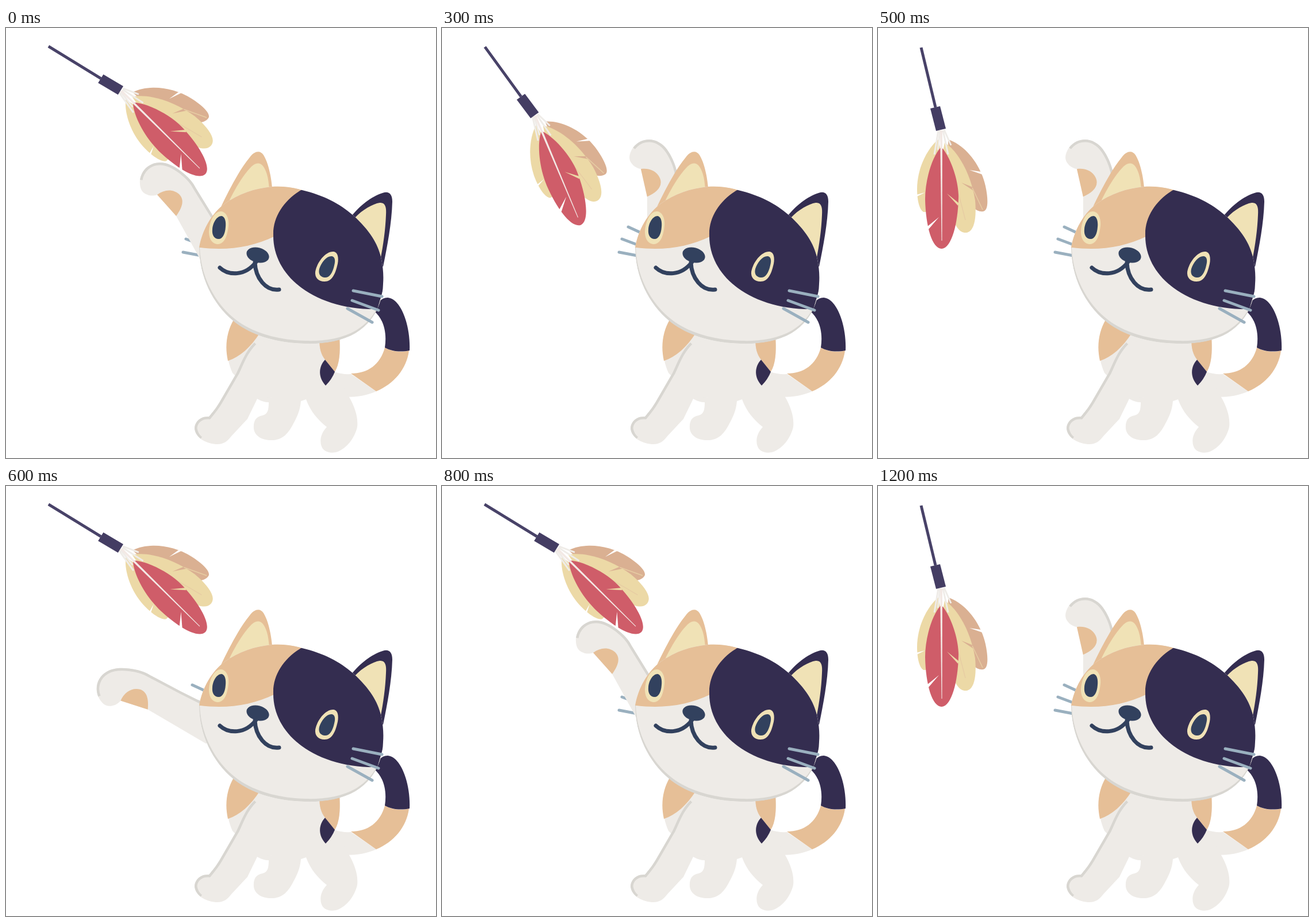
Recreate the animation shown at these times as an HTML page. Size 748x748 px, loop 1300 ms.

```html
<!DOCTYPE html>
<html lang="en">
<head>
<meta charset="utf-8">
<title>Cat and feather toy</title>
<style>
  html, body { margin: 0; width: 100%; height: 100%; overflow: hidden; background: #fff; }
  svg { display: block; width: 100%; height: 100%; }
  .light { fill: #eeebe7; }
  .shade { fill: #d8d6d1; }
  .orange { fill: #e6bf97; }
  .dark { fill: #342d50; }
  .cream { fill: #f0e2b6; }
  .navy { fill: #32415e; }
  .tan { fill: #dab092; }
  .straw { fill: #ecd9a6; }
  .red { fill: #cf5d69; }
  .white { fill: #fff; }
  .line { fill: none; stroke-linecap: round; }
  .edge { fill: none; stroke: #d8d6d1; stroke-width: 9; }
  .whisker { stroke: #9ab0bf; stroke-width: 5; }
  .mouth { stroke: #32415e; stroke-width: 7; }
  .quill { fill: none; stroke: #efece8; stroke-width: 3; }
</style>
</head>
<body>
<svg viewBox="0 0 748 748">
  <defs>
    <path id="headShape" d="M336 382C341 352 358 322 380 306C405 288 432 279 463 276C482 275 500 277 515 282C552 291 580 305 604 326C633 352 647 376 652 398C656 415 657 430 656 445C655 478 642 510 608 531C582 546 550 550 520 549C478 548 436 538 405 517C362 487 336 435 336 382Z"/>
    <path id="armShape" d="M263 290C258 292 250 292 246 290C236 287 232 278 233 264C236 246 250 234 268 234C280 234 292 240 304 249C316 258 325 268 330 278L362 330L420 420L353 430L296 327Z"/>
    <path id="legShape" d="M432 547C416 563 410 581 401 600L372 650C365 662 358 670 353 676C336 675 328 687 328 697C330 712 345 722 365 724C378 725 385 719 392 710L420 680L437 645L480 640L500 540Z"/>
    <clipPath id="headClip"><use href="#headShape"/></clipPath>
    <clipPath id="armClip"><use href="#armShape"/></clipPath>
    <clipPath id="legClip"><use href="#legShape"/></clipPath>
  </defs>

  <!-- tail -->
  <path class="light" d="M600 602L644 632C628 639 612 642 590 642L556 620L570 598Q585 603 600 602Z"/>
  <path class="orange" d="M659 556C672 563 687 565 701 561C697 593 675 619 644 632L600 601C630 601 651 585 659 556Z"/>
  <path class="dark" d="M641 493C645 479 652 469 664 469C688 471 704 520 702 561C687 564 672 563 659 556C663 530 657 507 641 493Z"/>

  <!-- body and legs -->
  <path class="light" d="M400 500C384 522 378 565 394 600L437 645Q447 651 457 651C457 665 455 672 446 674C434 676 430 685 431 697C433 711 447 718 465 717C482 716 492 704 500 688C508 674 512 662 513 649L522 646C530 668 543 682 558 694C548 705 546 715 548 725C551 738 565 741 577 737C592 731 606 715 611 694C613 676 606 658 597 642L572 598C580 583 582 565 580 535L500 500Z"/>
  <path class="orange" d="M400 502C384 524 380 552 386 579C407 572 425 556 442 530L420 500Z"/>
  <path class="orange" d="M545 540L580 536C582 565 580 585 572 598L555 577C548 568 545 558 545 540Z"/>
  <path class="dark" d="M555 577C543 590 543 608 556 622Q567 611 572 598Z"/>
  <use href="#legShape" class="light"/>
  <path class="edge" clip-path="url(#legClip)" d="M432 547C416 563 410 581 401 600L372 650C365 662 358 670 353 676C336 675 328 687 328 697Q330 708 338 715"/>

  <path class="line whisker" d="M324 346L350 358M313 367L345 379M308 390L345 397"/>

  <g id="arm">
    <use href="#armShape" class="light"/>
    <path class="orange" d="M263 290C276 280 292 280 302 290C311 300 306 313 296 327Z"/>
    <path class="edge" clip-path="url(#armClip)" d="M233 264C236 246 250 234 268 234C280 234 292 240 304 249C316 258 325 268 330 278L362 330L420 420"/>
  </g>

  <!-- ears -->
  <path class="orange" d="M373 313C388 282 405 248 424 225C432 214 442 212 448 221C457 236 461 258 463 278L463 295L382 315Z"/>
  <path class="cream" d="M389 299C400 277 413 255 427 241C436 233 444 234 449 243C455 253 457 266 458 282L400 302Z"/>
  <path class="dark" d="M602 326C615 310 635 293 655 287C667 283 672 290 672 302C671 340 663 380 656 415L640 405Z"/>
  <path class="cream" d="M607 330C620 316 638 306 650 304C660 303 662 312 661 325C660 352 656 378 652 399L630 370Z"/>

  <!-- head -->
  <g clip-path="url(#headClip)">
    <use href="#headShape" class="shade"/>
    <use href="#headShape" class="light" transform="translate(1 -5)"/>
    <path class="orange" d="M330 381C380 388 425 383 468 362L520 270L330 270Z"/>
    <path class="dark" d="M515 281C485 298 464 328 465 360C464 435 542 491 646 489L656 455L700 400L600 270Z"/>
  </g>
  <path class="cream" d="M374 319C384 320 388 332 387 344C385 362 380 375 369 376C358 376 353 366 353 354C354 336 362 319 374 319Z"/>
  <path class="navy" d="M375 327C381 328 383 337 382 346C381 360 376 367 370 367C362 367 358 360 359 350C360 338 367 327 375 327Z"/>
  <path class="cream" d="M570 389C577 390 579 399 577 410C573 428 567 441 554 441C543 441 537 434 538 424C541 407 556 388 570 389Z"/>
  <path class="navy" d="M567 397C573 398 573 406 571 413C568 427 562 435 554 434C546 433 543 427 545 419C549 407 558 396 567 397Z"/>
  <ellipse class="navy" cx="438" cy="395" rx="20" ry="13" transform="rotate(15 438 395)"/>
  <path class="line mouth" d="M372 417C387 431 416 432 435 407M433 408C434 435 452 458 475 455"/>
  <path class="line whisker" d="M604 457L654 467M602 474L648 491M594 488L637 512"/>

  <g id="toy">
    <path d="M75 34L100 138" fill="none" stroke="#484268" stroke-width="5"/>
    <path class="tan" d="M122 194C150 203 178 235 187 275C192 298 192 318 183 319C172 321 160 310 148 290C130 260 122 225 122 194Z"/>
    <path class="white" d="M159 247L179 250L182 255Z"/>
    <path class="straw" d="M105 194C85 210 68 245 68 280C68 300 72 316 79 320L92 320L112 230Z"/>
    <path class="white" d="M67 290L82 286L68 293Z"/>
    <path class="straw" d="M116 199C140 215 162 255 169 300C172 335 166 356 152 356C142 356 134 346 126 320L110 230Z"/>
    <path class="tan" d="M145 269L165 277L166 283Z"/>
    <path d="M120 225Q140 285 152 334M164 278L182 316" fill="none" stroke="#e7cda3" stroke-width="1.5"/>
    <path class="quill" d="M105 178L98 220M108 178L104 212M113 178L122 220M115 177L127 204"/>
    <path class="red" d="M110 207C125 222 141 265 140 297C139 340 128 383 111 384C94 384 83 345 82 298C82 262 95 222 110 207Z"/>
    <path class="white" d="M85 346L106 329L88 350Z"/>
    <path class="straw" d="M120 288L141 305L139 309Z"/>
    <path fill="#f3e9e5" d="M108 178H112L111.500 370H110.500Z"/>
    <path fill="#443d63" d="M91 140L108 136L118 175L101 179Z"/>
  </g>
</svg>
<script>
  const STEP = 100;
  const toyTurn = { up: -45, mid: -22.5, down: 0 };
  const armTurn = {
    high: "rotate(29 391 428)",
    middle: "",
    low: "rotate(-30.6 384 448)"
  };
  const poses = [
    ["up", "middle"], ["mid", "middle"], ["down", "middle"],
    ["mid", "high"], ["up", "high"], ["down", "high"],
    ["up", "low"], ["down", "low"],
    ["up", "middle"], ["down", "middle"],
    ["up", "high"], ["mid", "high"], ["down", "high"]
  ];
  const toy = document.getElementById("toy");
  const arm = document.getElementById("arm");
  const start = performance.now();

  function draw(now) {
    const elapsed = Math.max(0, now - start);
    const [swing, reach] = poses[Math.floor(elapsed / STEP) % poses.length];
    toy.setAttribute("transform", `rotate(${toyTurn[swing]} 72 34.3)`);
    arm.setAttribute("transform", armTurn[reach]);
    requestAnimationFrame(draw);
  }
  draw(start);
</script>
</body>
</html>
```
